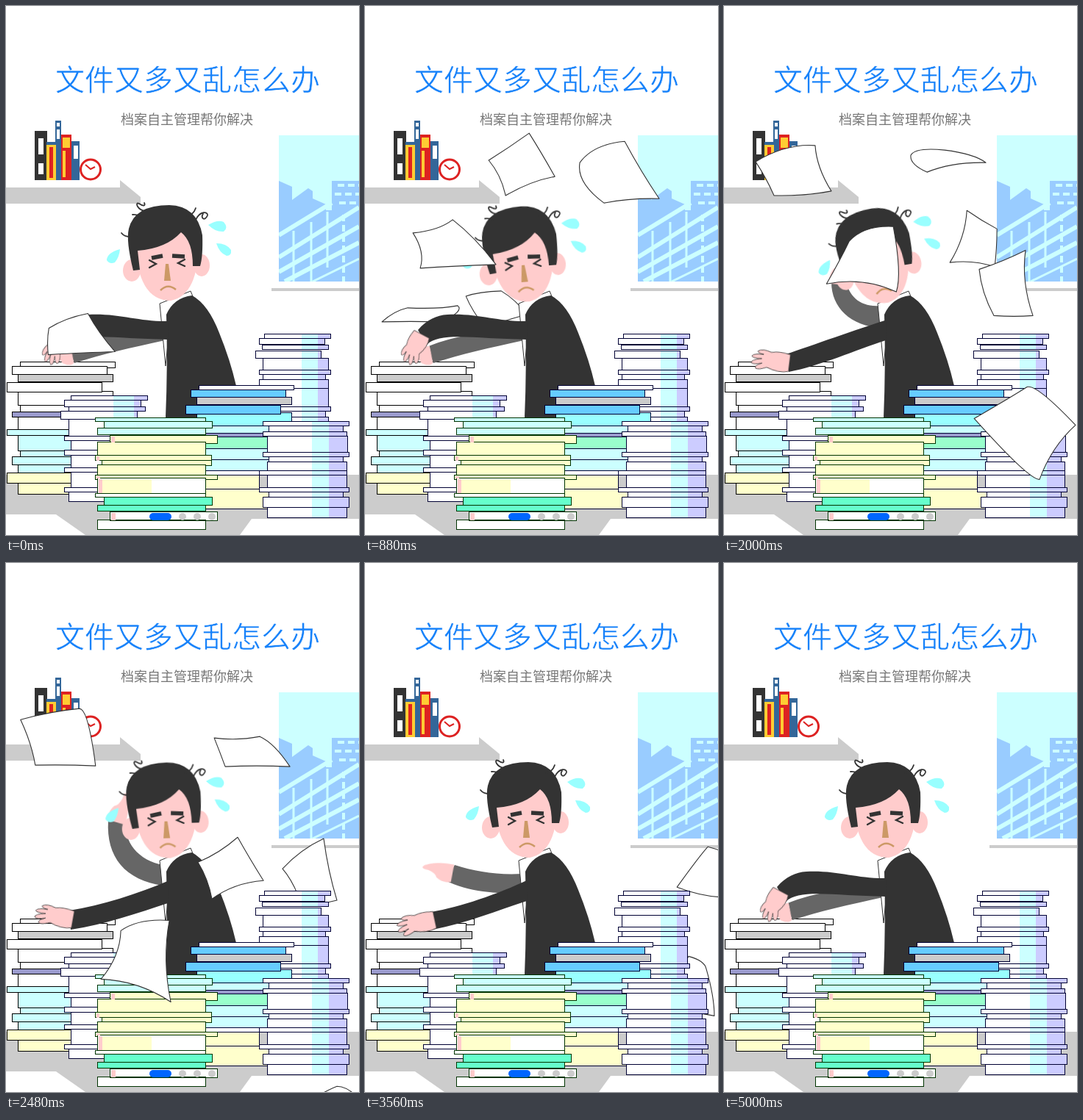
An HTML page without scripts that plays this animation: 480x720 px, repeating every 5.04 s.

```html
<!DOCTYPE html>
<html lang="zh">
<head>
<meta charset="utf-8">
<title>文件又多又乱怎么办</title>
<style>
html, body { margin: 0; width: 100%; height: 100%; overflow: hidden; background: #fff; }
svg { display: block; }
text { font-family: "Noto Sans CJK SC", "Noto Sans CJK", sans-serif; font-weight: 300; }
.pile path { stroke-width: 1; shape-rendering: crispEdges; }
.paper { fill: #fff; stroke: #333; stroke-width: 1.1; stroke-linejoin: round; animation: 5.04s linear infinite; }
.limb { animation: 5.04s ease-in-out infinite; }

#head { animation-name: head; transform-origin: 240px 405px; }
@keyframes head {
  0%, 70.63%, 78.57%, 99.21%, 100% { transform: rotate(0deg); }
  8.73% { transform: rotate(-7deg); }
  17.46% { transform: rotate(-4.3deg); }
  28.57% { transform: rotate(-9.7deg); }
  39.68% { transform: rotate(-9.3deg); }
  49.21%, 82.54%, 92.86% { transform: rotate(-1.6deg); }
}

#near { animation-name: near; }
@keyframes near {
  0%, 17.46%, 99.21%, 100% { d: path("M222 429C180 430 155 418 112 420C97 421 84 427 72 441L84 461C102 443 150 453 220 454z"); }
  8.73%, 28.57% { d: path("M222 423C170 425 116 442 78 472C77 473 76 474 75 475L80 497C115 473 160 453 220 450z"); }
  39.68% { d: path("M222 427C180 440 120 462 84 474C84 474 84 475 84 475L88 498C130 490 180 468 220 455z"); }
  49.21%, 82.54%, 92.86% { d: path("M222 432C180 450 130 466 86 473C86 473 86 474 86 474L88 499C135 492 180 476 220 463z"); }
  70.63% { d: path("M222 431C180 451 130 468 90 475C90 475 90 476 90 476L92 499C138 490 180 473 220 460z"); }
}
#nearHand { animation-name: nearHand; }
@keyframes nearHand {
  0%, 17.46%, 99.21%, 100% { transform: translate(76px, 450px) rotate(-62deg) scale(.85, 1); }
  8.73%, 28.57% { transform: translate(76px, 487px) rotate(-14deg); }
  39.68% { transform: translate(85px, 486px) rotate(7deg); }
  49.21%, 82.54%, 92.86% { transform: translate(87px, 485px) rotate(10deg); }
  70.63% { transform: translate(91px, 487px) rotate(-12deg); }
}

#far { animation-name: far; }
@keyframes far {
  0%, 17.46%, 99.21%, 100% { d: path("M218 440C180 440 125 447 84 464L93 486C130 474 170 465 216 455z"); }
  8.73%, 28.57% { d: path("M215 411C185 405 150 395 128 374L111 393C140 425 180 428 214 426z"); }
  39.68% { d: path("M212 408C185 410 170 395 166 374L146 376C146 410 172 436 214 438z"); }
  49.21%, 82.54%, 92.86% { d: path("M214 411C180 405 159 380 163 348L139 351C136 400 162 432 214 439z"); }
  70.63% { d: path("M214 423C180 425 150 420 122 411L109 432C140 448 180 450 214 450z"); }
}
#farHand { animation-name: farHand; }
@keyframes farHand {
  0%, 17.46%, 99.21%, 100% { transform: translate(88px, 475px) rotate(-14deg) scale(.75, 1); }
  8.73%, 28.57% { transform: translate(119px, 384px) rotate(52deg) scale(.75, 1); }
  39.68% { transform: translate(156px, 376px) rotate(92deg); }
  49.21%, 82.54%, 92.86% { transform: translate(151px, 350px) rotate(102deg); }
  70.63% { transform: translate(116px, 422px) rotate(6deg); }
}

@keyframes sheetA {
  0% { d: path("M58 439Q80 425 111 419Q125 445 148 471Q110 472 57 475Q55 455 58 439z"); visibility: visible; }
  11.1% { d: path("M235 180Q280 150 330 137Q340 180 360 225Q310 235 270 240Q240 210 235 180z"); }
  17.46% { d: path("M292 213Q310 188 353 184Q375 225 400 262Q360 261 325 268Q287 240 292 213z"); }
  28.57% { d: path("M363 308Q395 320 415 335Q420 360 409 402Q370 390 318 366Q340 345 363 308z"); }
  39.68% { d: path("M412 518Q425 514 478 570Q445 600 429 644Q415 645 340 561Q385 535 412 518z"); }
  49.21% { d: path("M450 712Q462 712 475 724Q470 760 450 790Q430 760 400 740Q430 720 450 712z"); visibility: visible; }
  53%, 100% { d: path("M455 760Q467 762 480 772Q475 808 455 838Q435 808 405 788Q435 768 455 760z"); visibility: hidden; }
}
@keyframes sheetB {
  0%, 3% { d: path("M58 439Q80 425 111 419Q125 445 148 471Q110 472 57 475Q55 455 58 439z"); visibility: hidden; }
  12% { d: path("M130 200Q160 170 190 148Q215 175 230 205Q195 220 160 240Q145 220 130 200z"); visibility: visible; }
  17.46% { d: path("M168 210Q195 193 223 173Q240 200 258 232Q225 238 191 258Q185 230 168 210z"); }
  28.57% { d: path("M298 209Q315 225 337 235Q338 255 334 286Q300 280 272 278Q295 250 298 209z"); }
  39.68% { d: path("M330 278Q350 292 371 303Q371 330 368 355Q340 345 307 349Q328 315 330 278z"); }
  49.21% { d: path("M432 375Q438 420 450 459Q420 468 397 452Q388 430 376 416Q400 390 432 375z"); }
  70.63% { d: path("M440 535Q462 541 464 552Q475 590 475 616Q440 610 400 600Q420 570 440 535z"); }
  77%, 100% { d: path("M440 625Q462 631 464 642Q475 680 475 706Q440 700 400 690Q420 660 440 625z"); visibility: hidden; }
}
@keyframes sheetC {
  0%, 8% { d: path("M58 439Q80 425 111 419Q125 445 138 461Q110 472 57 475Q55 455 58 439z"); visibility: hidden; }
  17.46% { d: path("M65 309Q100 306 119 291Q150 315 178 352Q120 354 75 357Q82 335 65 309z"); visibility: visible; }
  28.57% { d: path("M158 217Q205 210 215 225Q217 250 205 275Q150 276 115 262Q145 245 158 217z"); }
  34.2% { d: path("M200 150Q240 135 290 145Q300 170 280 205Q240 215 190 205Q195 175 200 150z"); }
  39.68% { d: path("M254 203Q260 192 300 196Q340 201 356 213Q310 212 276 226Q252 215 254 203z"); }
  49.21% { d: path("M283 238Q315 242 345 236Q365 245 386 277Q340 275 298 277Q291 258 283 238z"); }
  70.63% { d: path("M466 386Q490 392 510 405Q515 440 505 455Q465 457 424 441Q455 398 466 386z"); }
  76%, 100% { d: path("M526 426Q550 432 570 445Q575 480 565 495Q525 497 484 481Q515 438 526 426z"); visibility: hidden; }
}
@keyframes sheetD {
  0%, 12% { d: path("M70 440Q90 435 118 433Q138 445 150 465Q110 470 98 480Q78 460 70 440z"); visibility: hidden; }
  17.46% { d: path("M137 395Q155 389 185 388Q205 400 220 420Q180 430 165 440Q145 415 137 395z"); visibility: visible; }
  28.57% { d: path("M267 345Q300 330 330 321Q335 365 358 402Q310 405 284 395Q270 370 267 345z"); }
  39.68% { d: path("M347 358Q380 347 410 332Q404 375 420 421Q395 423 367 421Q350 390 347 358z"); }
  46%, 100% { d: path("M357 468Q390 457 420 442Q414 485 430 531Q405 533 377 531Q360 500 357 468z"); visibility: hidden; }
}
@keyframes sheetE {
  0%, 13% { d: path("M33 480Q50 465 70 461Q110 462 136 465Q125 475 105 482Q70 482 33 480z"); visibility: hidden; }
  17.46% { d: path("M23 430Q40 415 58 411Q100 413 126 408Q135 415 105 430Q60 429 23 430z"); visibility: visible; }
  28.57% { d: path("M30 347Q48 318 85 315Q128 310 133 328Q130 350 103 360Q75 345 30 347z"); }
  39.68% { d: path("M43 212Q85 187 124 190Q126 220 146 252Q110 259 68 258Q58 235 43 212z"); }
  45% { d: path("M35 190Q65 165 112 160Q115 190 130 222Q90 228 55 228Q45 210 35 190z"); }
  49.21% { d: path("M20 213Q60 202 100 198Q112 198 122 276Q80 274 40 275Q35 245 20 213z"); }
  61%, 100% { d: path("M-125 333Q-85 320 -37 318Q-38 350 -23 396Q-65 394 -105 395Q-110 365 -125 333z"); visibility: hidden; }
}
@keyframes sheetF {
  0%, 32% { d: path("M58 439Q80 425 111 419Q125 445 138 471Q110 472 57 475Q55 455 58 439z"); visibility: hidden; }
  39.68% { d: path("M170 320Q190 298 230 300Q242 365 234 389Q190 368 139 378Q158 345 170 320z"); visibility: visible; }
  49.21% { d: path("M261 407Q290 395 315 373Q330 400 350 432Q310 435 280 457Q275 430 261 407z"); }
  59%, 100% { d: path("M291 577Q320 565 345 543Q360 570 380 602Q340 605 310 627Q305 600 291 577z"); visibility: hidden; }
}
@keyframes sheetG {
  0%, 42% { d: path("M78 430Q105 415 142 416Q132 450 144 480Q100 475 59 470Q75 450 78 430z"); visibility: hidden; }
  49.21% { d: path("M156 500Q180 483 222 486Q212 540 224 597Q180 568 129 566Q155 535 156 500z"); visibility: visible; }
  58%, 100% { d: path("M226 730Q250 713 292 716Q282 770 294 827Q250 798 199 796Q225 765 226 730z"); visibility: hidden; }
}
</style>
</head>
<body>
<svg width="480" height="720" viewBox="0 0 480 720">
  <defs>
    <linearGradient id="shadeL" gradientUnits="userSpaceOnUse" x1="74" x2="193" y1="0" y2="0">
      <stop offset=".6" stop-color="#fff"/><stop offset=".6" stop-color="#cff"/>
      <stop offset=".84" stop-color="#cff"/><stop offset=".84" stop-color="#ccf"/>
    </linearGradient>
    <linearGradient id="shadeB" gradientUnits="userSpaceOnUse" x1="340" x2="442" y1="0" y2="0">
      <stop offset=".6" stop-color="#fff"/><stop offset=".6" stop-color="#cff"/>
      <stop offset=".82" stop-color="#cff"/><stop offset=".82" stop-color="#ccf"/>
    </linearGradient>
    <linearGradient id="shadeR" gradientUnits="userSpaceOnUse" x1="344" x2="467" y1="0" y2="0">
      <stop offset=".58" stop-color="#fff"/><stop offset=".58" stop-color="#cff"/>
      <stop offset=".77" stop-color="#cff"/><stop offset=".77" stop-color="#ccf"/>
    </linearGradient>
  </defs>

  <text x="67" y="115" font-size="40" fill="#1782fa" stroke="#fff" stroke-width=".6">文件又多又乱怎么办</text>
  <text x="156" y="161" font-size="18" fill="#777">档案自主管理帮你解决</text>

  <!-- shelf -->
  <path fill="#ccc" d="M0 247H155V237L183 260V269H0z"/>
  <path fill="#333" d="M39 170h17v67H39z"/>
  <path fill="#fff" d="M44 180h7v22h-7zM44 214h7v15h-7z"/>
  <path fill="#369" d="M67 156h8v81h-8zM55 185h13v52H55zM89 184h11v53H89z"/>
  <path fill="#fff" d="M69 159h4v5h-4zM69 168h4v13h-4zM92 190h6v18h-6z"/>
  <path fill="#fc3" d="M55 189h13v48H55z"/>
  <path fill="#d22" d="M59 192h5v42h-5zM75 175h14v62H75z"/>
  <path fill="#fc3" d="M77 179h10v14H77zM77 197h4v36h-4z"/>
  <g fill="#fff" stroke="#d22" stroke-width="3">
    <circle cx="115" cy="222.500" r="13.500"/>
    <path fill="none" stroke-width="2" d="M108 216L115 222L121 219"/>
  </g>

  <!-- window -->
  <svg x="371" y="176" width="109" height="199">
    <path fill="#cff" d="M0 0H109V199H0z"/>
    <path fill="#9cf" d="M0 62L18 70V88L40 72L46 76V86L64 94V102H72V62H109V199H0z"/>
    <g fill="none" stroke="#cff" stroke-width="6">
      <path d="M0 136L72 92M0 166L109 98M0 186L109 124M8 199L109 146"/>
      <path stroke-width="3" d="M46 199L109 168M20 130V199M44 118V199M66 104V180"/>
      <path stroke-width="4" stroke-dasharray="9 5" d="M80 68H109M76 80H109M82 92H109M88 108V199"/>
    </g>
  </svg>
  <path fill="#ccc" d="M361 384H480V388H361z"/>

  <!-- desk and the pile under the hands -->
  <path fill="#ccc" d="M0 638H480V698H334L318 720H108L68 692H0z"/>
  <g class="pile" transform="translate(.5 .5)" stroke="#000">
    <path fill="#fff" d="M19 484h129v8H19zM16 524h129v19H16zM19 543h129v9H19zM16 559h129v17H16z"/>
    <path fill="#fff" d="M8 490h129v11H8zM1 512h129v13H1z"/>
    <path fill="#ccc" d="M16 501h129v10H16z"/>
    <path fill="#99c" d="M8 552h129v7H8z"/>
    <path fill="#cff" d="M1 576h129v8H1zM16 584h129v21H16zM19 605h129v8H19zM8 613h129v11H8zM16 624h129v11H16z"/>
    <path fill="#ffc" d="M1 635h129v14H1zM16 649h129v15H16z"/>
  </g>

  <path class="paper" style="animation-name:sheetE"/>
  <path class="paper" style="animation-name:sheetB"/>
  <path class="paper" style="animation-name:sheetD"/>

  <!-- man -->
  <path id="far" class="limb" fill="#666"/>
  <path id="farHand" class="limb" fill="#fcc" d="M4 -12Q-20 -14 -36 -7Q-43 -2 -30 -1Q-20 2 -18 8Q-8 15 2 12z"/>
  <path fill="#fff" stroke="#333" d="M209 405L251 388L256 400L222 440L217 490z"/>
  <path fill="#333" d="M218 420Q228 397 253 394Q275 406 290 445Q305 482 313 517V560H217Q220 490 218 420z"/>
  <g id="head" class="limb">
    <g fill="#fcc">
      <ellipse cx="171" cy="360" rx="12" ry="15"/><ellipse cx="266" cy="353" rx="11" ry="15"/>
      <path d="M176 320Q178 401 224 401Q262 394 262 320L238 300z"/>
    </g>
    <path fill="#333" d="M173 360Q163 320 167 303Q175 271 222 271Q260 272 267 312Q268 340 264 354H254Q254 320 238 308Q218 330 179 333L182 359z"/>
    <g fill="none" stroke="#333" stroke-width="1.800" stroke-linecap="round">
      <path d="M157 309Q161 314 168 314M172 284Q180 283 186 290M190 279C178 278 175 266 181 269C187 273 190 272 188 268M246 286Q255 284 258 275M258 291C264 278 275 280 274 285C270 294 264 288 268 283"/>
      <path stroke-width="2.300" d="M195 346L204 351L195 356M243 345L234 350L243 354"/>
      <path stroke-width="5.500" stroke-linecap="butt" d="M198 343L213 340M226 340L243 341"/>
    </g>
    <path fill="#c96" d="M217 351H221L224 374H215z"/>
    <path fill="none" stroke="#c96" stroke-width="2.500" d="M210 387Q220 377 231 386"/>
    <path fill="#9ff" d="M275 298Q288 290 296 294Q303 302 296 307Q285 308 275 298zM286 323Q300 323 306 332Q307 340 300 340Q290 336 286 323zM155 331Q137 336 137 346Q141 352 148 349Q154 342 155 331z"/>
  </g>
  <path id="near" class="limb" fill="#333"/>
  <path id="nearHand" class="limb" fill="#fcc" stroke="#333" stroke-width=".8" d="M4 -12Q-12 -15 -22 -12Q-34 -16 -40 -12Q-42 -9 -32 -8Q-46 -8 -48 -4Q-47 -1 -34 -2Q-48 1 -48 5Q-45 8 -33 4Q-44 9 -41 12Q-37 14 -26 9Q-10 15 4 11z"/>

  <path class="paper" style="animation-name:sheetC"/>
  <path class="paper" style="animation-name:sheetF"/>

  <!-- front piles -->
  <g class="pile" transform="translate(.5 .5)">
    <path stroke="#003" fill="url(#shadeL)" d="M88 530h104v6H88zM79 536h104v9H79zM85 545h104v6H85zM74 551h104v11H74zM85 562h104v23H85zM79 585h104v6H79zM88 591h104v13H88zM79 604h104v7H79zM88 611h104v17H88zM79 628h104v6H79zM88 634h104v21H88zM79 655h104v6H79zM85 661h104v13H85z"/>
    <path stroke="#003" fill="url(#shadeB)" d="M351 446h90v6h-90zM344 452h89v8h-89zM348 461h90v6h-90zM339 469h89v10h-89zM349 479h89v16h-89zM344 495h97v6h-97zM349 501h85v7h-85zM344 508h94v12h-94zM354 520h84v25h-84zM348 545h93v6h-93zM344 551h90v8h-90zM354 559h84v11h-84z"/>
    <g stroke="#003">
      <path fill="#fff" d="M262 516h129v6H262zM259 632h100v6H259z"/>
      <path fill="#9ff" d="M259 553h129v18H259z"/>
      <path fill="#6cf" d="M251 522h129v10H251zM244 543h129v12H244z"/>
      <path fill="#ccc" d="M259 532h129v10H259z"/>
      <path fill="#cff" d="M262 571h100v10H262zM259 602h100v15H259zM259 617h100v15H259z"/>
      <path fill="#99c" d="M259 581h100v5H259z"/>
      <path fill="#9fc" d="M259 586h98v16H259z"/>
      <path fill="#ffc" d="M259 638h85v19H259zM259 657h98v27H259z"/>
    </g>
    <path stroke="#003" fill="url(#shadeR)" d="M349 565h117v6H349zM357 571h101v8H357zM349 579h114v6H349zM355 585h109v22H355zM349 607h117v6H349zM357 613h101v7H357zM355 620h108v12H355zM344 632h119v6H344zM355 638h108v17H355zM344 655h122v6H344zM357 661h101v7H357zM349 668h117v14H349zM355 682h108v14H355z"/>
    <g stroke="#030">
      <path fill="#cff" d="M121 560h150v5H121zM133 565h147v9H133zM124 574h147v9H124z"/>
      <path fill="#ffc" d="M141 584h146v11H141zM121 611h158v7H121zM130 618h149v7H130zM121 638h166v6H121z"/>
      <path fill="#ffc" d="M124 593h147v18H124zM124 624h147v14H124z"/>
      <path fill="#fff" d="M124 642h147v21H124zM121 663h150v5H121zM141 688h146v12H141zM124 699h147v13H124z"/>
      <path fill="#6fc" d="M133 668h147v11H133zM124 679h147v8H124z"/>
    </g>
    <path fill="#ffc" d="M130 643h67v19h-67z"/>
    <path fill="#fcc" d="M142 585h5v8h-5zM122 612h4v6h-4zM122 639h5v3h-5zM125 643h5v19h-5zM142 689h6v10h-6z"/>
  </g>

  <path class="paper" style="animation-name:sheetG"/>
  <path class="paper" style="animation-name:sheetA"/>

  <rect x="195" y="690" width="30" height="10" rx="5" fill="#06f"/>
  <g fill="#ccc"><circle cx="240" cy="695" r="5"/><circle cx="260" cy="695" r="5"/><circle cx="280" cy="695" r="5"/></g>
</svg>
</body>
</html>
```
